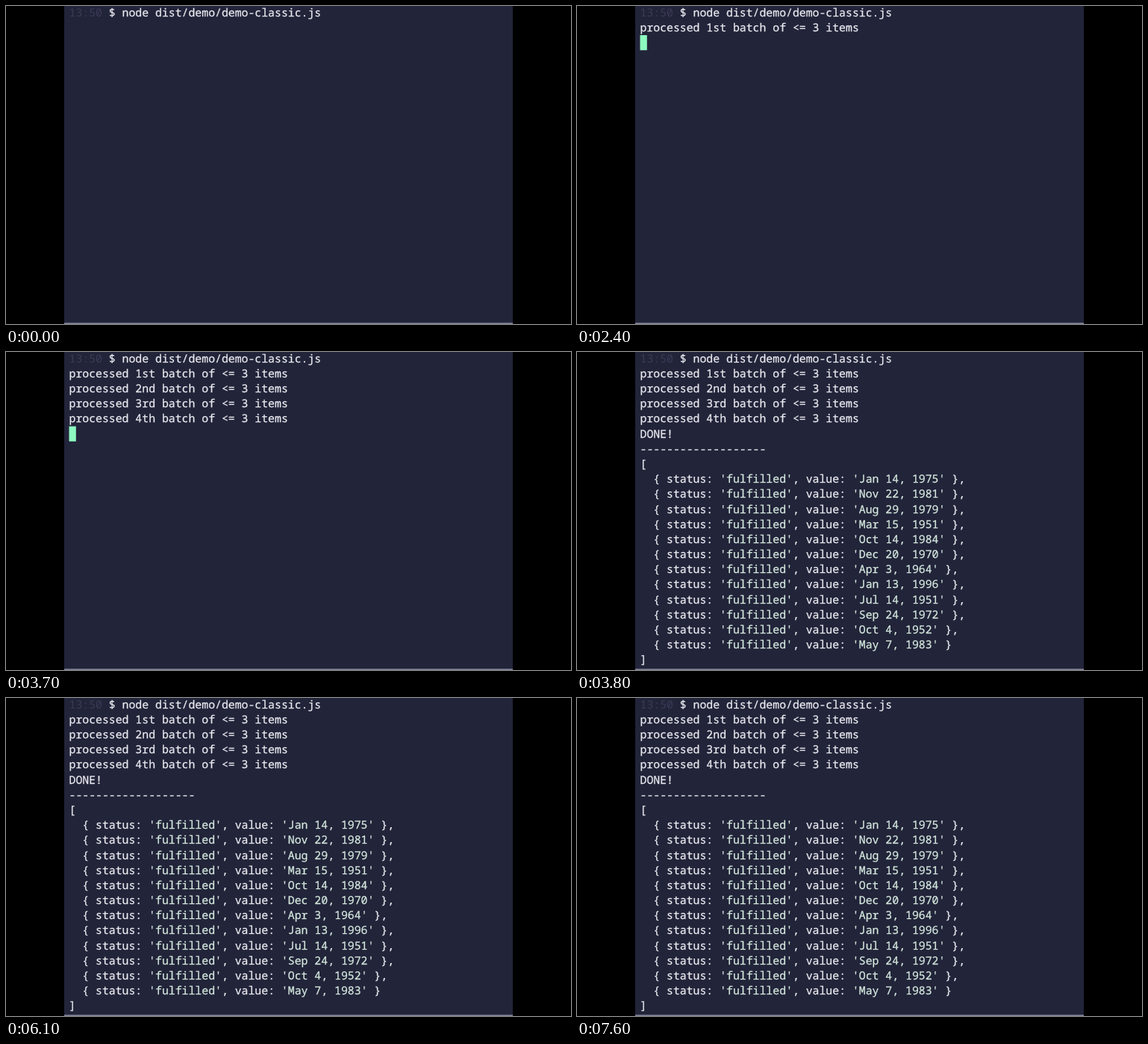
Recreate the animation shown at these times as an HTML page. Size 757x426 px, loop 7.7 s.

```html
<!DOCTYPE html>
<html>
<head>
<meta charset="utf-8">
<style>
html, body { margin: 0; width: 100%; height: 100%; overflow: hidden; background: #000; }
svg { display: block; }
text {
  font-family: "Noto Sans Mono", "DejaVu Sans Mono", monospace;
  font-size: 14.82px;
  white-space: pre;
  text-rendering: geometricPrecision;
  fill: #eaebf0;
  stroke: #eaebf0;
  stroke-width: .25px;
}
.dim { fill: #3b3b55; stroke: none; }
.string { fill: #d6eadf; stroke: #d6eadf; }
</style>
</head>
<body>
<svg width="757" height="426">
  <rect x="78" width="601" height="426" fill="#22243a"/>
  <rect x="78" y="424.4" width="601" height="1.6" fill="#85869a"/>
  <g id="screen"></g>
  <rect id="cursor" x="84.5" width="9.3" height="20.2" fill="#8dfbc0"/>
</svg>
<script>
const LOOP = 7700, BLINK = 600, ROW = 20.17;
const screen = document.getElementById('screen');
const cursor = document.getElementById('cursor');

const dates = ['Jan 14, 1975', 'Nov 22, 1981', 'Aug 29, 1979', 'Mar 15, 1951',
  'Oct 14, 1984', 'Dec 20, 1970', 'Apr 3, 1964', 'Jan 13, 1996',
  'Jul 14, 1951', 'Sep 24, 1972', 'Oct 4, 1952', 'May 7, 1983'];
const batches = ['1st', '2nd', '3rd', '4th'];
const batchTimes = [2400, 2900, 3300, 3700];
const doneTime = 3800;

const lines = [];
function addLine(text, time) {
  const el = document.createElementNS('http://www.w3.org/2000/svg', 'text');
  el.setAttribute('x', 84.5);
  el.setAttribute('y', 13.8 + lines.length * ROW);
  el.innerHTML = text.replace(/</g, '&lt;')
    .replace(/'[^']*'/g, '<tspan class="string">$&</tspan>')
    .replace(/^\d\d:\d\d/, '<tspan class="dim">$&</tspan>');
  screen.append(el);
  lines.push({ el, time });
}

addLine('13:50 $ node dist/demo/demo-classic.js', 0);
batches.forEach((name, i) => addLine(`processed ${name} batch of <= 3 items`, batchTimes[i]));
const output = ['DONE!', '-'.repeat(19), '[',
  ...dates.map((date, i) =>
    `  { status: 'fulfilled', value: '${date}' }${i < dates.length - 1 ? ',' : ''}`),
  ']'];
output.forEach(line => addLine(line, doneTime));

// The cursor blinks until output starts, then stays lit below the last line.
const cursorLit = t => t >= 100 && (t >= batchTimes[0] || Math.floor(t / BLINK) % 2 === 0);

function draw(t) {
  let row = 0;
  for (const { el, time } of lines) {
    const shown = t >= time;
    el.setAttribute('visibility', shown ? 'visible' : 'hidden');
    if (shown) row++;
  }
  cursor.setAttribute('y', row * ROW - 1.3);
  cursor.setAttribute('visibility', cursorLit(t) && t < doneTime ? 'visible' : 'hidden');
}

const start = performance.now();
function tick() {
  draw((performance.now() - start) % LOOP);
  requestAnimationFrame(tick);
}
tick();
</script>
</body>
</html>
```
